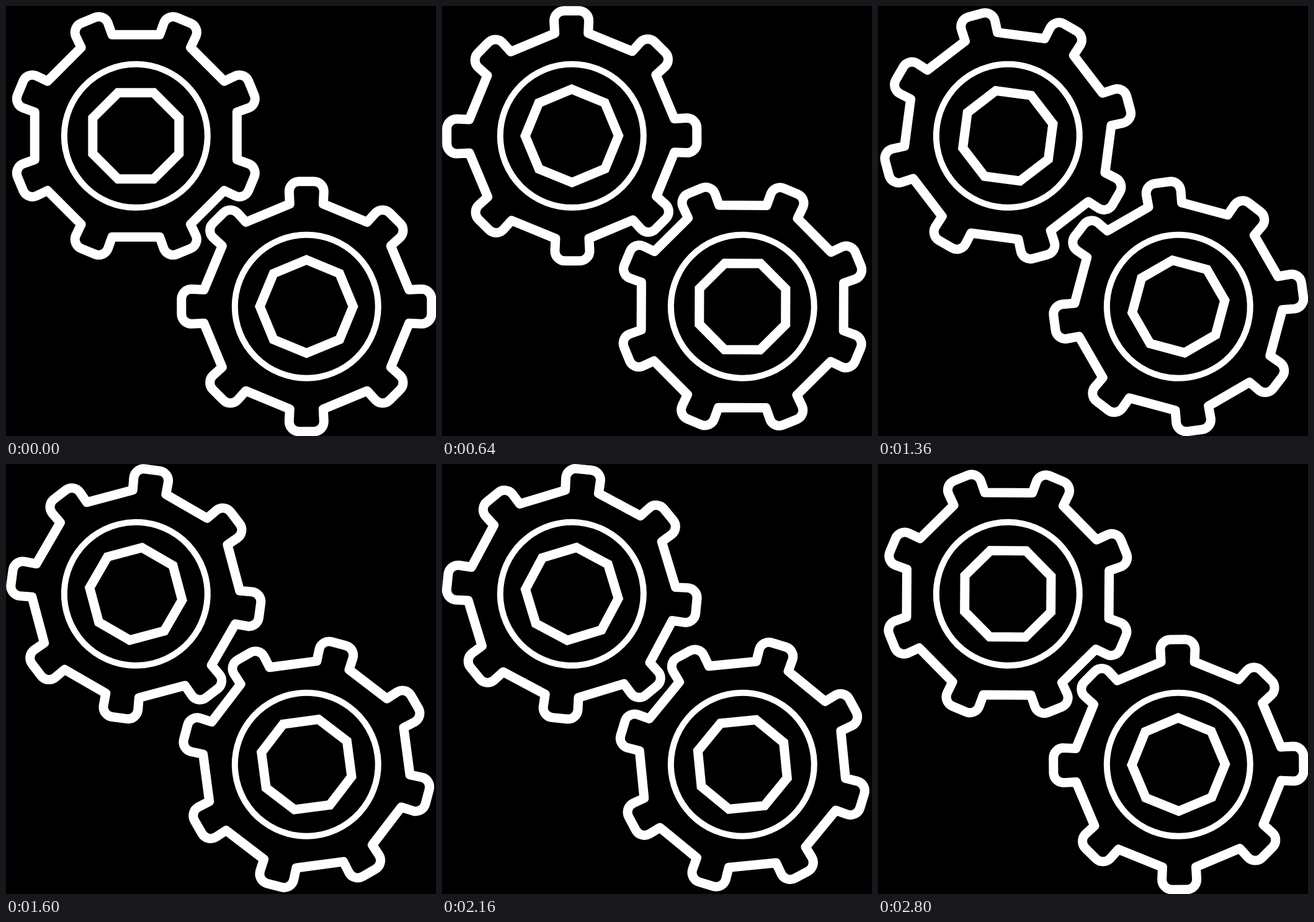
Animation, 693 px wide and 693 px high, one loop 2880 ms. Source, as an HTML page with a canvas:

```html
<!DOCTYPE html>
<html lang="en">
<head>
<meta charset="utf-8">
<title>Meshing gears</title>
<style>
  html, body { margin: 0; height: 100%; overflow: hidden; background: #000; }
  canvas { display: block; }
</style>
</head>
<body>
<canvas width="693" height="693"></canvas>
<script>
const ctx = document.querySelector('canvas').getContext('2d');
const LOOP = 2880, STEP = 80, EIGHTH = Math.PI / 4;

function stroke(width, join) {
  ctx.lineWidth = width;
  ctx.lineJoin = join;
  ctx.stroke();
}

// Adds one piece of outline per eighth of a turn, then closes it.
function eightfold(addPiece) {
  ctx.beginPath();
  for (let i = 0; i < 8; i++) {
    addPiece();
    ctx.rotate(EIGHTH);
  }
  ctx.closePath();
}

function addTooth() {
  const x = 28, top = -201.5, r = 16;
  ctx.lineTo(-27, -165.3);
  ctx.arc(r - x, top + r, r, Math.PI, 1.5 * Math.PI);
  ctx.arc(x - r, top + r, r, 1.5 * Math.PI, 2 * Math.PI);
  ctx.lineTo(27, -165.3);
}

function drawGear(center, angle) {
  ctx.save();
  ctx.translate(center, center);
  ctx.rotate(angle);
  eightfold(addTooth);
  stroke(15, 'round');
  eightfold(() => ctx.lineTo(0, -75.2));
  stroke(15, 'miter');
  ctx.beginPath();
  ctx.arc(0, 0, 115.5, 0, 2 * Math.PI);
  stroke(10, 'miter');
  ctx.restore();
}

function draw(now) {
  const p = Math.floor(now % LOOP / STEP) * STEP / LOOP;
  const turn = Math.PI * p * p * (3 - 2 * p);
  ctx.fillStyle = '#000';
  ctx.fillRect(0, 0, 693, 693);
  ctx.strokeStyle = '#fff';
  drawGear(209.3, EIGHTH / 2 - turn);
  drawGear(484.3, turn);
}

const start = performance.now();
function tick() {
  draw(performance.now() - start);
  requestAnimationFrame(tick);
}
tick();
</script>
</body>
</html>
```
